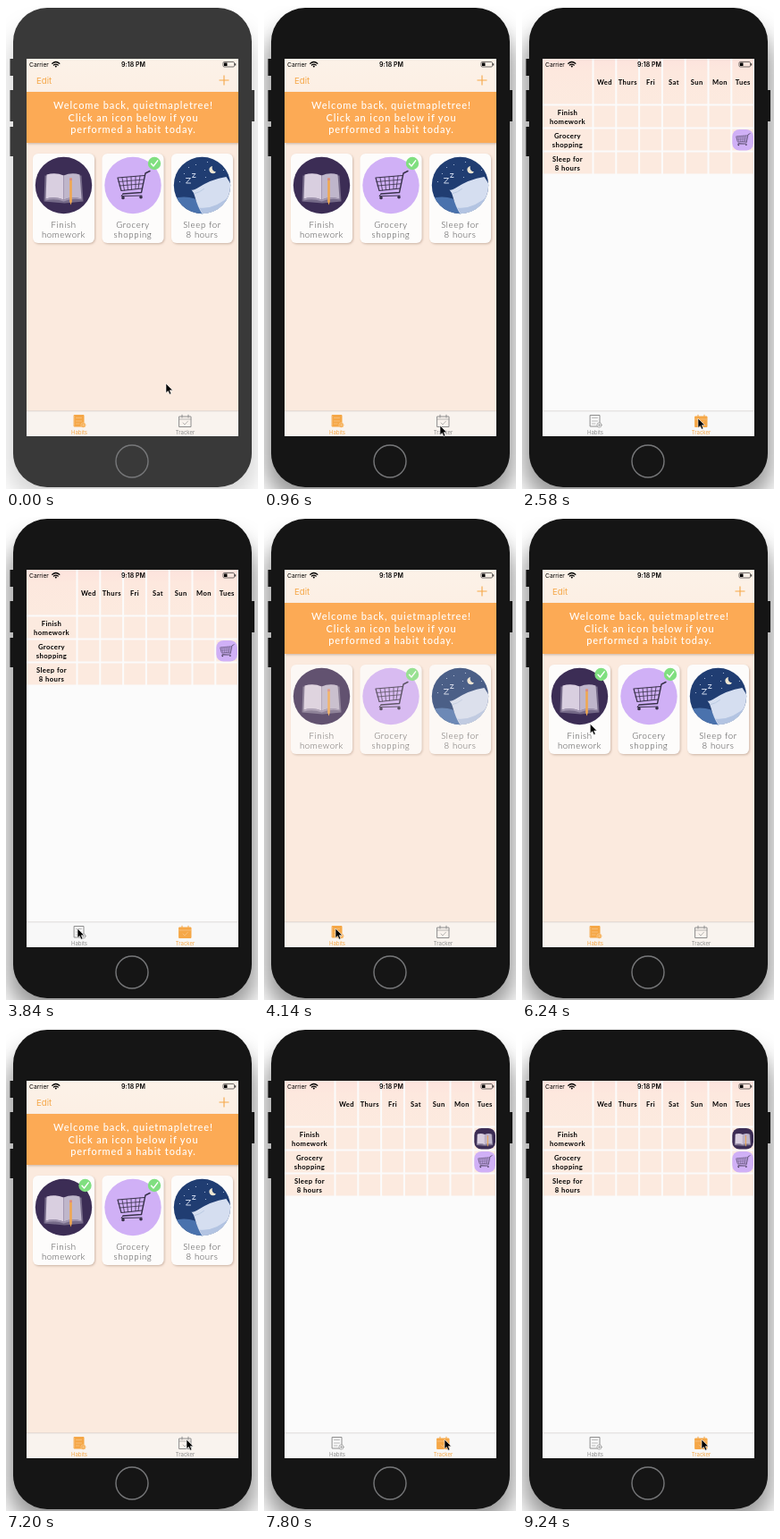
Recreate the animation shown at these times as an HTML page. Size 282 px wide and 540 px high, loop 9300 ms.

```html
<!DOCTYPE html>
<html lang="en">
<head>
<meta charset="utf-8">
<title>Habit tracker demo</title>
<style>
  html, body { margin: 0; width: 100%; height: 100%; overflow: hidden; background: #fff; }
  svg { display: block; width: 282px; height: 540px; }
  text { font-family: Lato, "Open Sans", sans-serif; text-anchor: middle; }
  .ios { font-family: Inter, Roboto, sans-serif; }
  .left { text-anchor: start; }
  .line { fill: none; stroke-linecap: round; stroke-linejoin: round; }
</style>
</head>
<body>
<svg id="stage" viewBox="0 0 282 540" xmlns="http://www.w3.org/2000/svg">
  <defs>
    <filter id="blur" x="-30%" y="-20%" width="160%" height="140%"><feGaussianBlur stdDeviation="13"/></filter>
    <filter id="soft" x="-10%" y="-10%" width="120%" height="130%">
      <feDropShadow dx="1" dy="1.2" stdDeviation="1" flood-color="#8a6a58" flood-opacity=".4"/>
    </filter>
    <linearGradient id="nav" x2="0" y2="1"><stop stop-color="#fcf2e8"/><stop offset="1" stop-color="#fcefe4"/></linearGradient>
    <linearGradient id="head" x2="0" y2="1">
      <stop stop-color="#fde3dd"/><stop offset=".3" stop-color="#fde8de"/><stop offset="1" stop-color="#fceadf"/>
    </linearGradient>
    <clipPath id="disc"><circle r="31.7"/></clipPath>
    <clipPath id="screen"><path d="M23 59H260V481H23Z"/></clipPath>

    <g id="book">
      <path d="M-21-11L-1-10 20-11 22 18 1 20-22 18Z" fill="#756a88"/>
      <path d="M-19-12Q-9-15 0-11V16Q-10 12-20 15Z" fill="#d9cfe0"/>
      <path d="M0-11Q9-15 18-12L20 15Q9 12 0 16Z" fill="#bfb6cb"/>
      <path d="M-20 15Q-10 12 0 16 9 12 20 15V16Q9 14 0 18-10 14-20 17Z" fill="#a196b0"/>
      <path d="M0-11V17" stroke="#9a8da8" stroke-width=".6"/>
      <path d="M6.7-8H9.3V18L8 22 6.7 18Z" fill="#f0a850"/>
      <path d="M6.7-8H9.3V-5.5H6.7Z" fill="#d98a86"/>
    </g>
    <g id="cart" class="line" stroke="#39324a">
      <path d="M19-16L14-13.5 9.5 8-11 9.5" stroke-width="1.4"/>
      <path d="M13-11L-17-8.5-13 6 10 3.5" stroke-width="1.2"/>
      <path d="M-16-4L12.5-6.5M-15 .5L11.5-1.8M-12-8.5L-9.5 5.5M-7-9L-5.5 5M-2-9.5L-1.5 4.5M3-10V4M8-10.5L6 3.8" stroke-width=".8"/>
      <path d="M-11 9.5L-13 12 10 11.5" stroke-width="1"/>
      <circle cx="-11" cy="14" r="1.8" fill="#39324a" stroke="none"/>
      <circle cx="9" cy="13.3" r="1.8" fill="#39324a" stroke="none"/>
    </g>
    <g id="sleep" clip-path="url(#disc)">
      <path d="M-34 15Q-20 11-8 15L2 35H-34Z" fill="#4a72ad"/>
      <path d="M-12 5Q-10 6-6 3.5 10-7 27-9.5L33 0V35H2Q-5 25-8 13-9 8-12 5Z" fill="#d5def0"/>
      <path d="M-3 25Q15 27 33 10V35H2Z" fill="#b3c4e2"/>
      <path d="M-8 9Q-3 8 2 4" class="line" stroke="#b3c4df" stroke-width=".8"/>
      <path d="M11.5-21.5A4.2 4.2 0 1 0 15.5-15 4.6 4.6 0 0 1 11.5-21.5Z" fill="#eee6d2"/>
      <path d="M-18-8H-13L-18-2.5H-13M-11-13H-7.5L-11-9H-7.5" class="line" stroke="#dbe4f4" stroke-width=".9"/>
      <g id="stars" fill="#b9c8e4"></g>
    </g>
    <g id="check">
      <circle r="7.2" fill="#80df80"/>
      <path d="M-3.5.3L-1 3 3.7-3.2" class="line" stroke="#fff" stroke-width="1.4"/>
    </g>
    <g id="habitsIcon" class="line" stroke-width="1">
      <path d="M-5.5-6.5H5V6H-5.5Z"/>
      <path d="M-3.5-3.5H2.5M-3.5 0H2.5M-3.5 3H0" class="rule"/>
      <circle cx="4.5" cy="4.5" r="2.6" class="dot"/>
      <path d="M3.3 4.5H5.7M4.5 3.3V5.7" class="rule"/>
    </g>
    <g id="trackerIcon" class="line" stroke-width="1">
      <path d="M-6.5-5H6.5V6.5H-6.5ZM-3.5-6.8V-4M3.5-6.8V-4"/>
      <path d="M-6.5-2H6.5M-2.5 2L-.5 4 3 .2" class="rule"/>
    </g>
  </defs>

  <rect id="shadow" x="2" y="24" width="278" height="530" rx="40" filter="url(#blur)"/>
  <g id="device">
    <path d="M4.5 59H11V78H4.5ZM4.5 94H11V129H4.5ZM4.5 135H11V168H4.5ZM272 94H278V129H272Z"/>
    <rect x="8" y="2" width="267" height="536" rx="38"/>
  </g>
  <circle cx="141" cy="509" r="18" fill="none" stroke="#77787a" stroke-width="1.4"/>

  <g clip-path="url(#screen)">
    <g id="habits"></g>
    <g id="tracker"></g>
    <g id="status">
      <text class="ios left" x="26" y="68" font-size="6.7">Carrier</text>
      <text class="ios" x="142.5" y="68.2" font-size="7" font-weight="600">9:18 PM</text>
      <g class="line" stroke="#000" stroke-width="1.3" stroke-linecap="butt">
        <path d="M51.8 64.3Q55.8 60.8 59.8 64.3M53.4 66.1Q55.8 64.2 58.2 66.1"/>
      </g>
      <circle cx="55.8" cy="67.5" r="1"/>
      <rect x="243" y="62.5" width="12.5" height="5.5" rx="1.2" fill="none" stroke="#333" stroke-width=".7"/>
      <path d="M244 63.4H247.5V67.1H244ZM256.3 64.2H257.2V66.4H256.3Z"/>
    </g>
    <g id="tabs"></g>
  </g>
  <path id="cursor" d="M0 0V10.6L2.4 8.4 4.1 12.2 5.9 11.4 4.3 7.7H7.6Z" stroke="#fff" stroke-width=".6"/>
</svg>

<script>
const LOOP = 9300, ORANGE = '#f5a747', GREY = '#8e8e8e';
const el = id => document.getElementById(id);
const rect = (x, y, w, h, fill, extra = '') =>
  `<rect x="${x}" y="${y}" width="${w}" height="${h}" fill="${fill}" ${extra}/>`;
const text = (str, x, y, size, extra = '') => `<text x="${x}" y="${y}" font-size="${size}" ${extra}>${str}</text>`;
const use = (id, x, y, scale = 1, extra = '') =>
  `<use href="#${id}" transform="translate(${x} ${y}) scale(${scale})" ${extra}/>`;

const habits = [
  { icon: 'book', color: '#3c2d55', label: ['Finish', 'homework'] },
  { icon: 'cart', color: '#d0b0f6', label: ['Grocery', 'shopping'] },
  { icon: 'sleep', color: '#203d72', label: ['Sleep for', '8 hours'] },
];
const days = ['Wed', 'Thurs', 'Fri', 'Sat', 'Sun', 'Mon', 'Tues'];

function card({ icon, color, label }, i) {
  const cx = 64.5 + i * 77.5;
  const style = 'fill="#444" font-weight="300" letter-spacing=".65"';
  return rect(cx - 34.5, 165, 69, 100, '#fdfcfb', 'rx="6" filter="url(#soft)"') +
    `<circle cx="${cx}" cy="200.5" r="31.7" fill="${color}"/>` +
    use(icon, cx, 200.5) +
    text(label[0], cx, 248.3, 9.6, style) + text(label[1], cx, 258.8, 9.6, style);
}

function habitsPage() {
  const welcome = ['Welcome back, quietmapletree!', 'Click an icon below if you', 'performed a habit today.'];
  return rect(23, 59, 237, 422, '#fbeade') +
    rect(23, 59, 237, 37, 'url(#nav)') +
    text('Edit', 34, 86.8, 9.6, `class="ios left" fill="${ORANGE}"`) +
    `<path d="M238.5 83H249.5M244 77.5V88.5" stroke="${ORANGE}" stroke-width="1.1"/>` +
    rect(23, 96, 237, 57, '#fcaa55', 'filter="url(#soft)"') +
    welcome.map((s, i) => text(s, 142.5, 115 + i * 13.5, 11, 'fill="#fff" font-weight="500" letter-spacing=".9"')).join('') +
    `<g id="cards">${habits.map(card).join('')}${use('check', 166, 176)}${use('check', 88.5, 176, 1, 'id="newCheck"')}</g>`;
}

function trackerPage() {
  const bold = 'font-weight="700" letter-spacing=".4"';
  const colX = i => 80.5 + i * 25.8, rowY = i => 111.5 + i * 26;
  let out = rect(23, 59, 237, 422, '#fbfbfb') + rect(23, 59, 55.5, 50.5, 'url(#head)');
  days.forEach((day, i) => {
    out += rect(colX(i), 59, 23.8, 50.5, 'url(#head)') + text(day, colX(i) + 12, 88, 7.6, bold);
  });
  habits.forEach(({ label }, r) => {
    out += rect(23, rowY(r), 55.5, 24, '#fceadf');
    days.forEach((_, c) => out += rect(colX(c), rowY(r), 23.8, 24, '#fceadf'));
    label.forEach((s, i) => out += text(s, 51, rowY(r) + 10.7 + i * 9.3, 7.7, bold));
  });
  const badge = (r, scale) => rect(235.3, rowY(r) + .5, 23.7, 23.5, habits[r].color, 'rx="8"') +
    use(habits[r].icon, 247, rowY(r) + 12, scale);
  return out + `<g id="newBadge">${badge(0, .42)}</g>` + badge(1, .43);
}

function tab(icon, label, x, active) {
  const tint = active ? ORANGE : GREY;
  const rule = active ? '#f9cf98' : GREY;
  const shape = el(icon).innerHTML
    .replaceAll('class="rule"', `fill="none" stroke="${rule}" stroke-width=".6"`)
    .replaceAll('class="dot"', `fill="${active ? ORANGE : '#f8f8f8'}" stroke="${rule}" stroke-width=".7"`);
  return `<g class="line" transform="translate(${x} 464)"><g stroke="${tint}" stroke-width="1" fill="${active ? tint : 'none'}">${shape}</g></g>` +
    text(label, x, 479, 6, `class="ios" fill="${tint}"`);
}

const tabBar = onTracker => rect(23, 453, 237, 28, onTracker ? '#f8f8f8' : '#f9f3ee') +
  rect(23, 452.6, 237, .6, '#c9c4c0') +
  tab('habitsIcon', 'Habits', 82, !onTracker) + tab('trackerIcon', 'Tracker', 200.5, onTracker);

el('stars').innerHTML = [[-20, -13], [-7, -23], [3, -17], [6, -26], [24, -17], [-25, -4], [4, -9], [-15, -20]]
  .map(([x, y]) => `<circle cx="${x}" cy="${y}" r=".6"/>`).join('');
el('habits').innerHTML = habitsPage();
el('tracker').innerHTML = trackerPage();
el('tabs').innerHTML = `<g id="tabsHome">${tabBar(false)}</g><g id="tabsTracker">${tabBar(true)}</g>`;

// Cursor stops: time, x, y
const stops = [
  [0, 179, 422], [120, 179, 422], [840, 197, 469], [1200, 197, 469], [1700, 197, 461],
  [2640, 197, 461], [3600, 80, 460], [4320, 80, 460], [5220, 58, 198],
  [6000, 58, 198], [7080, 202, 460], [9000, 202, 460], [9200, 201, 460], [LOOP, 201, 460],
];
const clamp = v => Math.max(0, Math.min(1, v));
const progress = (t, from, to) => clamp((t - from) / (to - from));
const ease = p => p * p * (3 - 2 * p);

function cursorAt(t) {
  const i = Math.max(1, stops.findIndex(s => s[0] > t));
  const [t0, x0, y0] = stops[i - 1], [t1, x1, y1] = stops[i];
  const p = ease(progress(t, t0, t1));
  return [x0 + (x1 - x0) * p, y0 + (y1 - y0) * p];
}

const show = (id, on) => el(id).setAttribute('visibility', on ? 'visible' : 'hidden');

function render(t) {
  const onTracker = (t >= 1320 && t < 3960) || t >= 7440;
  const focused = t >= 780;
  const logged = t >= 5520;
  el('device').setAttribute('fill', focused ? '#151515' : '#393939');
  el('shadow').setAttribute('fill-opacity', focused ? .42 : .16);
  el('habits').style.display = onTracker ? 'none' : '';
  el('tracker').style.display = onTracker ? '' : 'none';
  show('tabsHome', !onTracker);
  show('tabsTracker', onTracker);
  show('newCheck', logged);
  el('newBadge').style.display = logged ? '' : 'none';
  el('cards').setAttribute('opacity', t < 3960 ? 1 : .5 + .5 * progress(t, 3960, 4260));
  el('cursor').setAttribute('transform', `translate(${cursorAt(t)})`);
}

const start = performance.now();
function tick() {
  render((performance.now() - start) % LOOP);
  requestAnimationFrame(tick);
}
tick();
</script>
</body>
</html>
```
